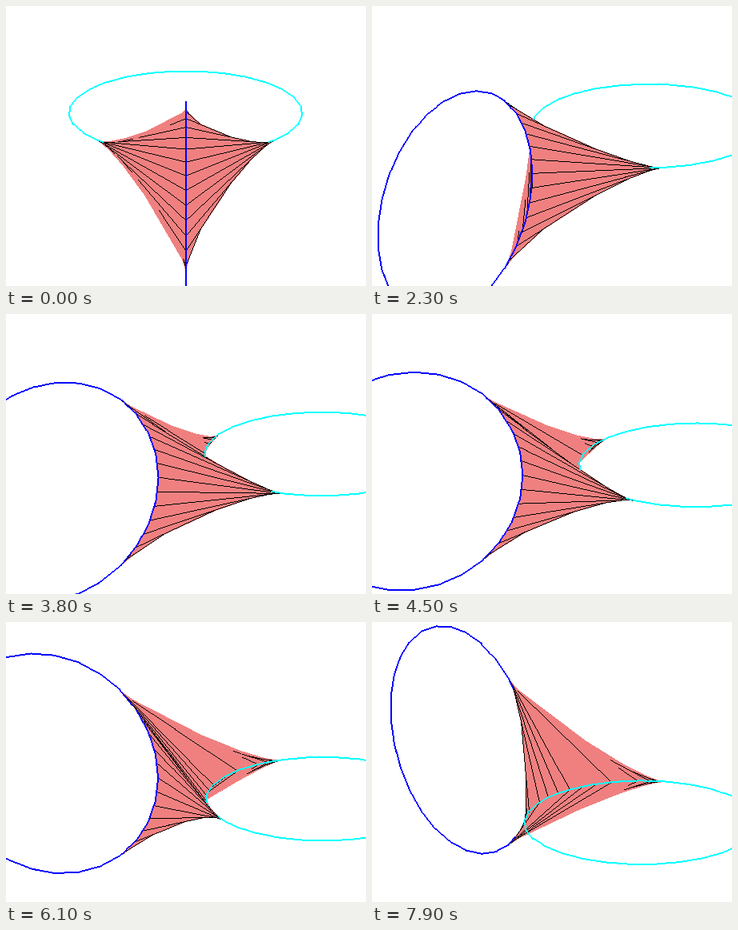
These frames come from a looping animation (450 px wide and 350 px high, 8 s). A matplotlib script:

```python
import numpy as np
import matplotlib.pyplot as plt
from matplotlib.animation import FuncAnimation
from matplotlib.collections import PolyCollection

W, H, DPI = 450, 350, 100
RADIUS, CENTER = 146, (225, 199.5)
GAP = 2.5                      # distance of the two centres, in radii
TILT = np.radians(21)
STEP = np.radians(1.8)
FRAMES = 80
BLACK, BLUE, CYAN = (0, 0, 0, 255), (0, 0, 255, 255), (0, 255, 255, 255)


def partner(angle):
    """Angle on the other circle whose tangent meets the axis at the same point."""
    return np.arccos(np.clip(1 / (GAP - 1 / np.cos(angle)), -1, 1))


def blue_point(t):
    return np.stack([np.cos(t) - GAP / 2, 0 * t, np.sin(t)], -1)


def cyan_point(t):
    return np.stack([GAP / 2 - np.cos(t), np.sin(t), 0 * t], -1)


def build_surface():
    """Four strips of triangles, and the rulings to ink on them."""
    by_blue = np.radians(np.arange(0, 46, 7.5))
    by_cyan = np.radians([15, 7.5, 0])
    theta = np.concatenate([by_blue, partner(by_cyan)])
    phi = np.concatenate([partner(by_blue), by_cyan])
    rulings, triangles = [], []
    for up in (1, -1):
        for side in (1, -1):
            b, c = blue_point(up * theta), cyan_point(side * phi)
            inked = len(theta) if up == side else len(by_blue)
            rulings += list(zip(b[:inked], c[:inked]))
            for k in range(len(b) - 1):
                if side > 0:
                    triangles += [(b[k], b[k + 1], c[k + 1]), (b[k], c[k + 1], c[k])]
                else:
                    triangles += [(b[k], b[k + 1], c[k]), (b[k + 1], c[k + 1], c[k])]
    return np.array(rulings), np.array(triangles)


def circle(point):
    ring = point(np.linspace(0, 2 * np.pi, 30))
    return np.stack([ring[:-1], ring[1:]], 1)


def view(p, az):
    """Rotate, then return pixel x, pixel y and nearness."""
    u, v, z = p[..., 0], p[..., 1], p[..., 2]
    away = u * np.cos(az) - v * np.sin(az)
    right = u * np.sin(az) + v * np.cos(az)
    up = away * np.sin(TILT) + z * np.cos(TILT)
    near = z * np.sin(TILT) - away * np.cos(TILT)
    return np.stack([CENTER[0] + RADIUS * right, CENTER[1] - RADIUS * up, near], -1)


def hidden(points, tris, eps):
    """True where some triangle lies in front of the point."""
    a, e1, e2 = tris[:, 0], tris[:, 1] - tris[:, 0], tris[:, 2] - tris[:, 0]
    det = e1[:, 0] * e2[:, 1] - e1[:, 1] * e2[:, 0]
    ok = np.abs(det) > 1e-3
    a, e1, e2, det = a[ok], e1[ok], e2[ok], det[ok]
    dx = points[:, None, 0] - a[:, 0]
    dy = points[:, None, 1] - a[:, 1]
    p = (dx * e2[:, 1] - dy * e2[:, 0]) / det
    q = (dy * e1[:, 0] - dx * e1[:, 1]) / det
    near = a[:, 2] + p * e1[:, 2] + q * e2[:, 2]
    inside = (p >= 0) & (q >= 0) & (p + q <= 1)
    return (inside & (near > points[:, None, 2] + eps)).any(axis=1)


def trace(segments):
    """One point per pixel along each segment, and the direction across it."""
    points, across = [], []
    for start, end in segments:
        dx, dy = np.abs(end - start)[:2]
        n = int(max(dx, dy)) + 2
        points.append(start + np.linspace(0, 1, n)[:, None] * (end - start))
        across.append(np.tile((0, -1) if dx > dy else (-1, 0), (n, 1)))
    return np.concatenate(points), np.concatenate(across)


def ink(canvas, segments, tris, az, color, width, eps):
    """Draw the visible parts of the segments as crisp lines."""
    points, across = trace(view(segments, az))
    seen = ~hidden(points, tris, eps)
    pixels = np.floor(points[seen, :2]).astype(int)
    for i in range(width):
        x, y = (pixels + i * across[seen]).T
        ok = (x >= 0) & (x < W) & (y >= 0) & (y < H)
        canvas[y[ok], x[ok]] = color


rulings, triangles = build_surface()
cyan_ring, blue_ring = circle(cyan_point), circle(blue_point)

fig = plt.figure(figsize=(W / DPI, H / DPI), dpi=DPI, facecolor="white")
ax = fig.add_axes([0, 0, 1, 1])
skin = PolyCollection([], facecolor="lightcoral", edgecolor="none",
                      linewidth=0, antialiased=False, zorder=1)
ax.add_collection(skin)
lines = ax.imshow(np.zeros((H, W, 4), np.uint8), extent=(0, W, H, 0),
                  interpolation="nearest", aspect="auto", zorder=2)
ax.set(xlim=(0, W), ylim=(H, 0))
ax.axis("off")


def draw(frame):
    az = frame * STEP
    tris = view(triangles, az)
    skin.set_verts(list(tris[..., :2]))
    canvas = np.zeros((H, W, 4), np.uint8)
    ink(canvas, rulings, tris, az, BLACK, 1, 5e-4)
    ink(canvas, cyan_ring, tris, az, CYAN, 2, 0.012)
    ink(canvas, blue_ring, tris, az, BLUE, 2, 0.012)
    lines.set_data(canvas)
    return skin, lines


anim = FuncAnimation(fig, draw, frames=FRAMES, interval=100, repeat=True,
                     repeat_delay=0, blit=False)
plt.show()
```
